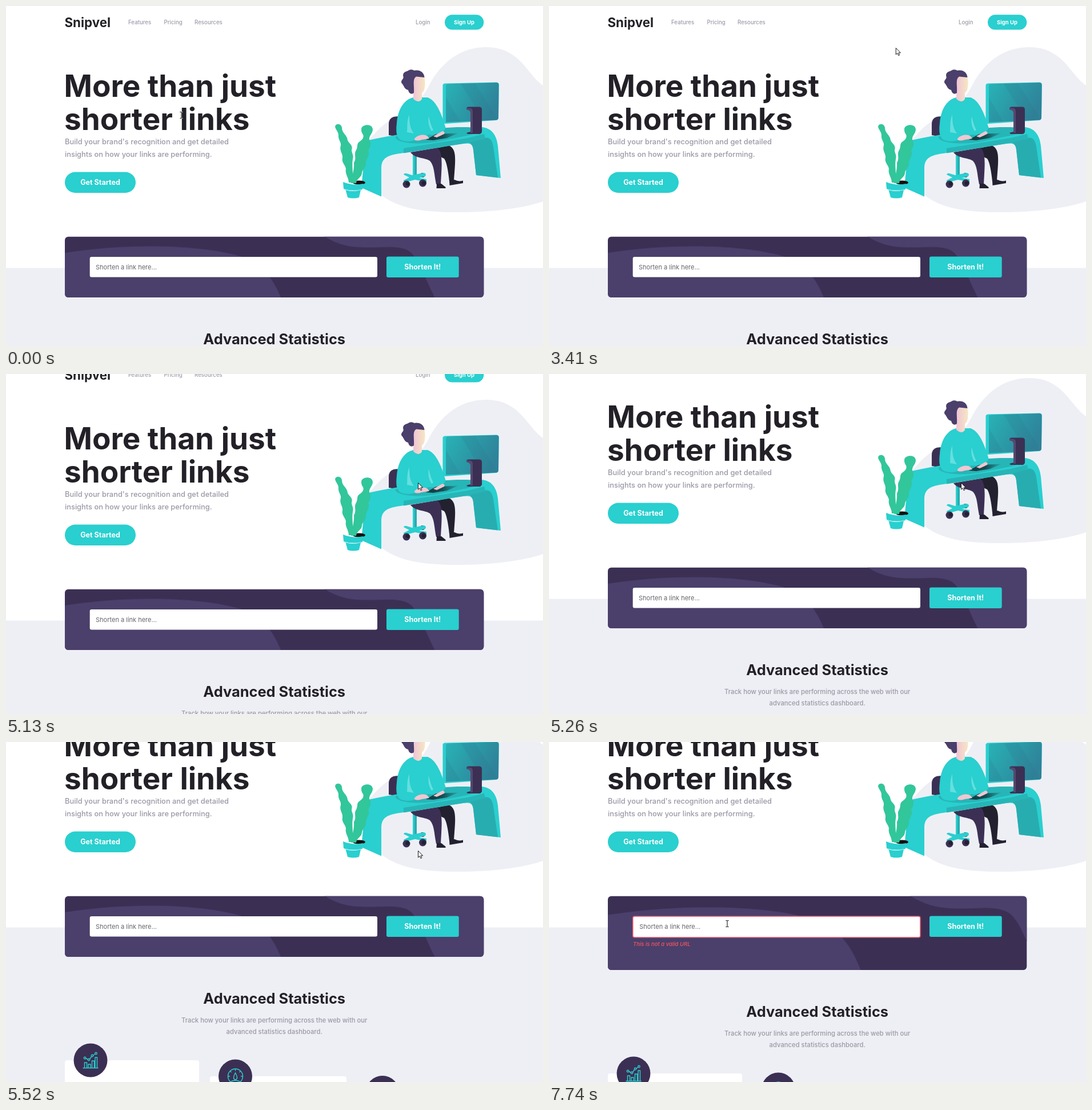
Animation, 940 px wide and 595 px high, one loop 8000 ms. Source, as an HTML page:

```html
<!DOCTYPE html>
<html lang="en">
<head>
<meta charset="utf-8">
<title>Link shortener page</title>
<style>
  html, body { margin: 0; width: 100%; height: 100%; overflow: hidden; background: #fff; }
  svg { display: block; }
  text { font-family: Inter, "Open Sans", sans-serif; fill: #232127; }
  .b { font-weight: 700; }
  .h1 { font-size: 53px; }
  .h2 { font-size: 25.4px; }
  .logo { font-size: 22.3px; }
  .nav { font-size: 9.7px; font-weight: 500; fill: #9e9aa8; }
  .lead { font-size: 12.85px; font-weight: 500; fill: #9b98a5; }
  .sub { font-size: 11.25px; font-weight: 500; fill: #9b98a5; }
  .btn { font-size: 12.5px; fill: #fff; }
  .hint { font-size: 11px; fill: #66646b; }
  .err { font-size: 9.5px; font-weight: 500; font-style: italic; fill: #f4575f; }
  .mid { text-anchor: middle; }
  .teal { fill: #2acfcf; }
  .deep { fill: #27adb0; }
  .dark { fill: #3b3054; }
  .ink { fill: #232130; }
  .skin { fill: #f3c6d0; }
  .leaf { fill: #32c69b; }
  .fog { fill: #eeeff5; }
  .line { fill: none; stroke: #2acfcf; stroke-width: 1.4; }
  .pointer { fill: #fff; stroke: #000; stroke-width: .9; stroke-linejoin: round; }
  #beam { fill: none; stroke: #fff; stroke-width: 1; mix-blend-mode: difference; }
</style>
</head>
<body>
<svg width="940" height="595" viewBox="0 0 940 595">
<defs>
  <clipPath id="clip"><rect id="clipBox" x="103" y="403.700" width="733.300" height="106.400" rx="6"/></clipPath>
  <clipPath id="glass"><path d="M773 136.500L858 134Q862.500 134 862.500 138L862 195Q862 199 858 199.500L770 203.500V140Q770 137 773 136.500Z"/></clipPath>
  <linearGradient id="screen" x2="1" y2=".45">
    <stop stop-color="#27b6b8"/><stop offset="1" stop-color="#2f8299"/>
  </linearGradient>
  <linearGradient id="face">
    <stop offset=".1" stop-color="#f0c6d5"/><stop offset="1" stop-color="#f6e7c2"/>
  </linearGradient>
  <linearGradient id="keys">
    <stop stop-color="#143840"/><stop offset=".5" stop-color="#164c52"/><stop offset="1" stop-color="#25aaad"/>
  </linearGradient>
</defs>
<rect width="940" height="595" fill="#fff"/>

<g id="page">
  <rect class="fog" y="458.500" width="940" height="500"/>

  <!-- header -->
  <text class="b logo" x="102.500" y="36.500">Snipvel</text>
  <text class="nav" id="nav0" x="214" y="31.500">Features</text>
  <text class="nav" id="nav1" x="276.500" y="31.500">Pricing</text>
  <text class="nav" id="nav2" x="330" y="31.500">Resources</text>
  <text class="nav" x="717" y="31.500">Login</text>
  <rect class="teal" x="768" y="15.300" width="68.300" height="26.200" rx="13.100"/>
  <text class="b btn mid" x="802" y="31.700" style="font-size:9.500px">Sign Up</text>

  <!-- hero -->
  <text class="b h1" x="101.500" y="158.500">More than just</text>
  <text class="b h1" x="102" y="216.500">shorter links</text>
  <text class="lead" x="103" y="242.300">Build your brand's recognition and get detailed</text>
  <text class="lead" x="103" y="263.800">insights on how your links are performing.</text>
  <rect class="teal" x="103" y="290.500" width="124" height="36.500" rx="18.250"/>
  <text class="b btn mid" x="165" y="313.200">Get Started</text>

  <!-- illustration -->
  <path class="fog" d="M940 139C912 120 900 72 840 72C792 72 758 104 740 140C722 176 692 188 668 203C655 212 645 222 632 240L650 325C680 352 720 361 790 361C850 361 905 354 940 342Z"/>
  <path class="dark" d="M688 193.500Q670 192 670 207V226L688 229Z"/>
  <path class="ink" d="M748 250L775 244C789 250 787 266 784 305L776 307C774 288 771 272 767 267L752 260Z"/>
  <path class="ink" d="M776 306.500L785 304Q792 308 800 305.500V310L776.500 314Z"/>
  <path class="deep" d="M712 255H719V298H712Z"/>
  <path class="teal" d="M712 255H715V298H712Z"/>
  <circle class="ink" cx="729" cy="296" r="4"/>
  <path class="teal" d="M696 295Q697 292 701 293L711 296L731 292Q737 293 734 298L723 301L736 303V308L716 304L697 309L696 305L706 300Z"/>
  <circle class="dark" cx="701" cy="312" r="6.500"/><circle class="ink" cx="703" cy="311" r="3.500"/>
  <circle class="dark" cx="729.500" cy="310" r="6.500"/><circle class="ink" cx="731" cy="310" r="3.500"/>
  <path class="dark" d="M708 256L755 248C765 256 763 276 761 312L753 312C749 292 750 280 742 271C733 265 716 267 708 256Z"/>
  <path class="ink" d="M754 311H762L769.500 317V319H753.500Z"/>

  <path class="teal" d="M630 236C680 224 760 214 832 212C850 213 859 226 861 245L866 301L823 296L818 250C817 242 812 239 800 241L690 258C668 261 658 266 657 282V333.500L622 318Z"/>
  <path class="deep" d="M838 231C846 229 851 234 853 246L861 300.500L823 296L818 252C817 243 814 239 806 238Z"/>
  <path fill="#27b5b7" d="M696 249L808 231L837 224L839 232L806 240L696 257.500Z"/>
  <path fill="#27b5b7" d="M682 229C700 220 780 207 832 214C844 222 795 229 752 238C716 244 680 238 682 229Z"/>

  <path class="teal" d="M768 135.500L858 133.500Q863 133.500 863 138L862 195Q862 199.500 858 200L769 206Q764.500 206 764.500 201V139Q764.500 136 768 135.500Z"/>
  <g clip-path="url(#glass)">
    <rect x="764" y="130" width="100" height="80" fill="url(#screen)"/>
    <path fill="#2d7288" opacity=".18" d="M764 150L800 210H764ZM792 130H818L868 210H842Z"/>
  </g>
  <path class="dark" d="M806 179Q806 176.500 810 176.500H829Q833 177 833 181V221L830 224H808L806 222L813 220V186Q813 182 806 181Z"/>
  <path fill="#56486f" d="M806 178L814 179Q817 180 817 185V222H813V186Q813 182 806 181Z"/>

  <path class="teal" d="M713 160C696 164 686 181 684 205C682 222 684 231 692 235C705 239 715 236 722 232L740 225C750 227 768 222 769.500 213C764 194 755 166 738 160Z"/>
  <path fill="#64dfdf" d="M706 190C701 202 703 213 702 221L714 223C707 214 706 204 706 190ZM740 193C738 204 741 213 745 219L748 217C744 210 742 202 740 193Z"/>
  <path fill="url(#keys)" d="M735 234L753 224L792 222.500L772 231L748 235Z"/>
  <path class="skin" d="M715 232C720 226 732 223 738 228L741 232L728 234Q719 237 715 234Z"/>
  <path class="skin" d="M748 228L764 219Q769 220 767 224L754 230Z"/>
  <path fill="url(#face)" d="M713 121H731Q734 128 733.500 137Q733 150 728 152V163Q722 171 713 162.500V150Q711 135 713 121Z"/>
  <path fill="#4b3f6b" d="M705 112.500Q710 110 715 113C724 111 732 116 732.500 125L718 123.500C711 128 715 139 714 152C709 156 705 152 704 147C697 146 697 139 692.500 135C690 129 698 128 695 122C695 114 702 115 705 112.500Z"/>

  <ellipse cx="618" cy="309" rx="11" ry="3.600" fill="#111"/>
  <path class="leaf" d="M576 211C577 205 587 205 588 213C588 223 597 225 598 235C600 241 608 243 605 252C605 258 609 260 607 268C605 280 608 288 607 309H600C600 300 593 294 595 285C594 278 587 274 589 266C590 258 583 254 586 244C587 238 581 234 582 226C582 220 577 217 576 211Z"/>
  <path class="leaf" d="M622 215C623 207 641 205 642 216C642 223 635 227 636 234C640 240 638 247 634 252C638 262 630 267 630 274C631 283 624 285 623 292C623 300 614 301 613 310H604C606 295 610 286 609 274C614 266 609 260 612 254C617 246 613 242 618 238C624 234 627 230 625 225C622 221 622 218 622 215Z"/>
  <path class="teal" d="M590 308Q608 315 625 311L624 321Q607 325 591 320Z"/>
  <path class="teal" d="M594.500 322Q607 326 621 322L618 335Q608 338 598 335Z"/>
  <path d="M592 321Q607 325 623 321" fill="none" stroke="#7fe3e3" stroke-width=".8"/>

  <!-- form -->
  <g clip-path="url(#clip)">
    <rect class="dark" x="103" y="403" width="734" height="140"/>
    <path id="waves" fill="#4b3f6b" d="M0 28C110 11 230 13 304 33C340 43 364 68 380 111H0ZM454 -1C480 15 500 18.500 530 18.500C560 18.500 578 15 597 22C618 30 626 64 650 111H734V-1Z"/>
  </g>
  <rect id="field" x="146.700" y="439" width="503.300" height="35.500" rx="3" fill="#fff" stroke="#e5566a" stroke-width="0"/>
  <text class="hint" id="hint" x="157" y="460.800">Shorten a link here...</text>
  <rect id="send" x="666" y="438.500" width="126.700" height="36.500" rx="3"/>
  <text class="b btn mid" x="729.300" y="461.300">Shorten It!</text>
  <text class="err" id="err" x="147" y="490.700">This is not a valid URL</text>

  <!-- statistics -->
  <g id="low">
    <text class="b h2 mid" x="469.700" y="592">Advanced Statistics</text>
    <text class="sub mid" x="469.700" y="625">Track how your links are performing across the web with our</text>
    <text class="sub mid" x="469.700" y="645">advanced statistics dashboard.</text>
    <rect x="103" y="691" width="235" height="200" rx="4" fill="#fff"/>
    <rect x="357" y="719" width="239" height="200" rx="4" fill="#fff"/>
    <rect x="614" y="747" width="222" height="200" rx="4" fill="#fff"/>
    <g transform="translate(148 691)">
      <circle class="dark" r="29.500"/>
      <path class="line" d="M-13.500 13.500H13.500M-10.500 13V4H-6.500V13M-4 13V7H0V13M2.500 13V1H6.500V13M8 13V-5H11.500V13M-8.500 -3.500L-4.500 -1.500M-1.500 -2L1.500 -6.500M4.500 -8.500L8 -11"/>
      <g class="line"><circle cx="-10" cy="-4" r="1.700"/><circle cx="-3" cy="-1" r="1.700"/><circle cx="3" cy="-8" r="1.700"/><circle cx="9.500" cy="-12" r="1.700"/></g>
    </g>
    <g transform="translate(401.500 719)">
      <circle class="dark" r="29.500"/>
      <circle class="line" r="13"/>
      <path class="line" d="M0 -13V-9.500M-13 0H-9.500M13 0H9.500M-9 -9L-7 -7M9 -9L7 -7M0 -6Q6 5 0 6Q-6 5 0 -6ZM-8.500 9.500Q0 5 8.500 9.500"/>
    </g>
    <circle class="dark" cx="659" cy="747.500" r="29.500"/>
  </g>
</g>

<path id="arrow" class="pointer" d="M.5 .5V12L3.200 9.600L5 13.700L6.900 12.800L5.100 8.900H8.700Z"/>
<path id="hand" class="pointer" d="M-1.400 8V.8Q0 -1.400 1.400 .8V5Q2.800 4 3.800 5.400Q5.200 4.600 6 6Q7.600 5.600 7.600 7.400V10.500Q7.600 13 6 15H0Q-2 12 -4.200 9Q-3.600 6.800 -1.400 8Z"/>
<path id="beam" d="M-2.500 -5.500H-.8L0 -4.800L.8 -5.500H2.500M0 -4.800V4.800M-2.500 5.500H-.8L0 4.800L.8 5.500H2.500"/>
</svg>

<script>
const LOOP = 8000, GREY = [158, 154, 168], INK = [45, 42, 54],
      TEAL = [42, 207, 207], HOVER = [55, 162, 177];
const $ = id => document.getElementById(id);

const bursts = [[120, 1120, 8], [1260, 2190, 8], [2340, 3280, 8], [3410, 3800, 4],
  [4400, 4400, 1], [4980, 5520, 5], [5800, 6520, 6], [6800, 6800, 1], [7180, 7740, 5]];
const ticks = [0];
for (const [a, b, n] of bursts)
  for (let i = 0; i < n; i++) ticks.push(n > 1 ? Math.round(a + (b - a) * i / (n - 1)) : a);

// time, x, y, pointer kept until the next row
const moves = [
  [0, 307, 191, 'beam'], [560, 281, 116, 'arrow'], [1120, 256, 69, 'arrow'],
  [1650, 241, 36, 'hand'], [1830, 243, 28, 'hand'], [2050, 257, 27, 'arrow'],
  [2190, 261, 26, 'arrow'], [2340, 287, 26, 'hand'], [2590, 385, 30, 'arrow'],
  [3280, 567, 46, 'arrow'], [3800, 726, 154, 'arrow'], [4400, 721, 174, 'arrow'],
  [4980, 720.5, 186, 'arrow'], [5115, 721, 190, 'arrow'], [5520, 721, 190, 'arrow'],
  [6230, 728, 307, 'hand'], [6520, 730, 323, 'hand'], [6800, 730, 323, 'hand'],
  [7180, 700, 322, 'hand'], [7310, 640, 321, 'beam'], [7740, 312, 318, 'beam']];
const scrolls = [[4980, 0], [5115, 27], [5250, 65], [5385, 102], [5520, 134]];

// element, colours, hover start and end
const hovers = [['nav0', GREY, INK, 1600, 2190], ['nav1', GREY, INK, 2280, 2400],
  ['nav2', GREY, INK, 2400, 2590], ['send', TEAL, HOVER, 6200, 7120]];

const clamp = v => Math.max(0, Math.min(1, v));

function at(rows, t, col) {
  let i = 0;
  while (i < rows.length - 1 && rows[i + 1][0] <= t) i++;
  const a = rows[i], b = rows[i + 1] || a;
  if (typeof a[col] === 'string') return a[col];
  return a[col] + (b[col] - a[col]) * clamp((t - a[0]) / (b[0] - a[0] || 1));
}

function draw(time) {
  const t = ticks.findLast(k => k <= time);
  const bad = t >= 6800, high = bad ? 129.3 : 106.4, grow = Math.max(1, high / 111);

  $('page').setAttribute('transform', `translate(0 ${-at(scrolls, t, 1)})`);
  for (const [id, from, to, on, off] of hovers) {
    const k = clamp((t - on) / 250) * (1 - clamp((t - off) / 250));
    $(id).style.fill = `rgb(${from.map((v, i) => Math.round(v + (to[i] - v) * k))})`;
  }

  $('clipBox').setAttribute('height', high);
  $('waves').setAttribute('transform', `translate(103 404) scale(${grow})`);
  $('low').setAttribute('transform', `translate(0 ${bad ? 23 : 0})`);
  $('field').setAttribute('height', bad ? 37 : 35.5);
  $('field').setAttribute('stroke-width', bad ? 1.6 : 0);
  $('hint').setAttribute('transform', bad ? 'translate(1.3 .7)' : '');
  $('err').style.display = bad ? '' : 'none';

  const kind = at(moves, t, 3);
  for (const id of ['arrow', 'hand', 'beam']) $(id).style.display = id === kind ? '' : 'none';
  $(kind).setAttribute('transform', `translate(${at(moves, t, 1)} ${at(moves, t, 2)})`);
}

const start = performance.now();
function loop() {
  draw((performance.now() - start) % LOOP);
  requestAnimationFrame(loop);
}
loop();
</script>
</body>
</html>
```
